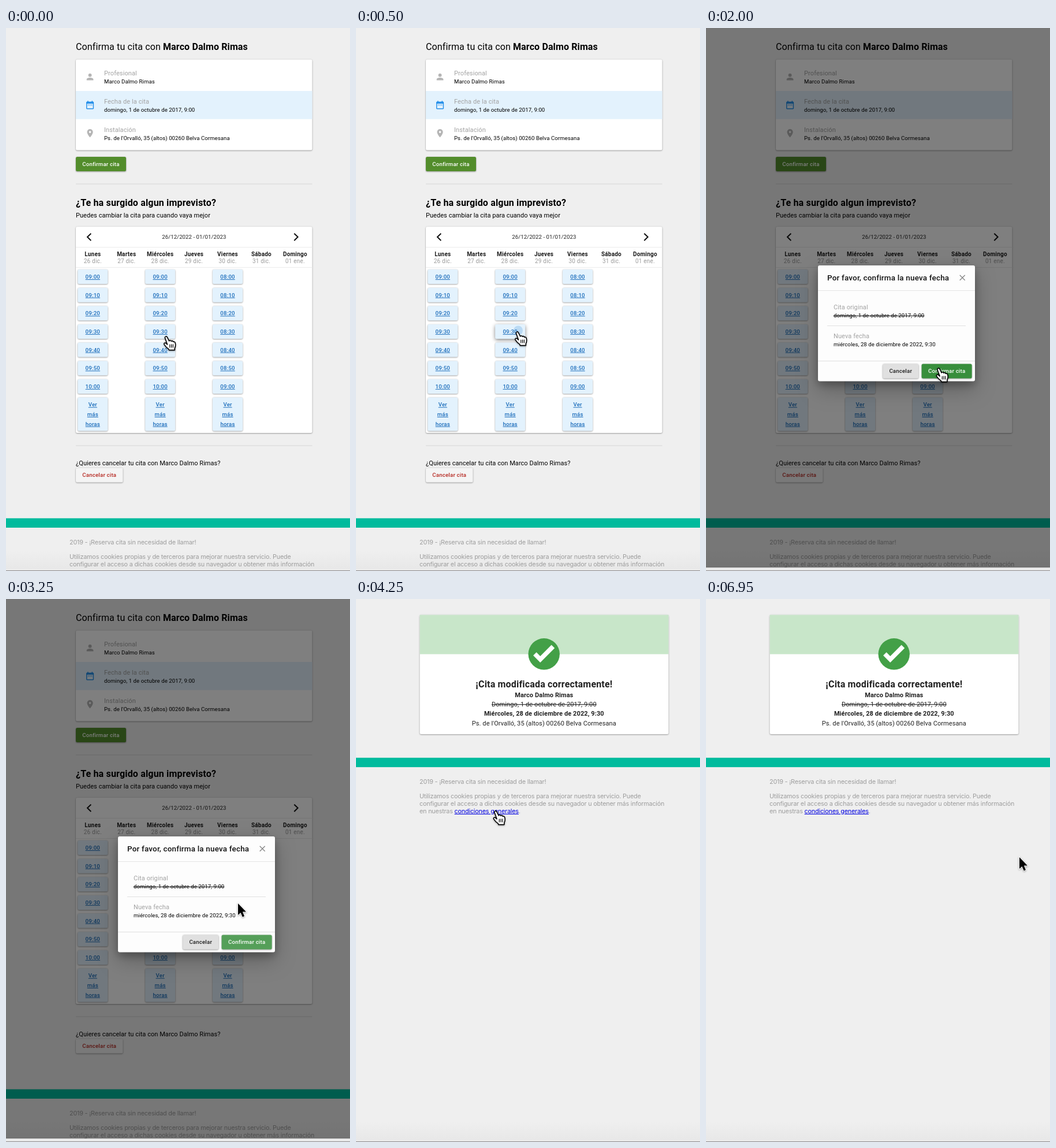
An HTML page that plays this animation: 596x940 px, repeating every 7.4 s.

```html
<!DOCTYPE html>
<html lang="es">
<head>
<meta charset="utf-8">
<title>Cambio de cita</title>
<style>
html, body { margin: 0; width: 100%; height: 100%; overflow: hidden; background: #efefef; }
svg { display: block; width: 596px; height: 940px; font-family: Roboto, sans-serif; }
.h { font-size: 16px; letter-spacing: .12px; }
.h.b { letter-spacing: .17px; }
.p { font-size: 11px; letter-spacing: .05px; }
.label { font-size: 11px; letter-spacing: .1px; fill: #a2a2a2; }
.s { font-size: 9.6px; letter-spacing: .07px; }
.btn { font-size: 9.6px; letter-spacing: .2px; font-weight: 500; }
.day { font-size: 10px; letter-spacing: .2px; }
.r { font-size: 11px; letter-spacing: .09px; fill: #212121; }
.foot { font: 10.8px Inter, sans-serif; letter-spacing: -.19px; fill: #9d9d9d; }
.slot { fill: #1c6dbb; text-decoration: underline; }
.title { font-size: 13.4px; letter-spacing: .22px; font-weight: 500; fill: #111; }
.b { font-weight: 700; }
.m { text-anchor: middle; }
.strike { text-decoration: line-through; }
.link { fill: #0000e0; text-decoration: underline; }
.up { filter: drop-shadow(0 1px 1px rgba(0,0,0,.3)) drop-shadow(0 0 1px rgba(0,0,0,.12)); }
.up.hover { filter: drop-shadow(0 2px 3px rgba(0,0,0,.5)); }
.high { filter: drop-shadow(0 6px 7px rgba(0,0,0,.25)) drop-shadow(0 12px 17px rgba(0,0,0,.25)); }
.cursor { filter: drop-shadow(0 1.5px 1.5px rgba(0,0,0,.35)); }
</style>
</head>
<body>
<svg id="stage" viewBox="0 0 596 940"></svg>
<script>
const LOOP = 7400;
const NAME = "Marco Dalmo Rimas";
const PLACE = "Ps. de l'Orvalló, 35 (altos) 00260 Belva Cormesana";
const OLD = "omingo, 1 de octubre de 2017, 9:00";
const NEW = "iércoles, 28 de diciembre de 2022, 9:30";

const text = (x, y, cls, str, fill = "") =>
  `<text x="${x}" y="${y}" class="${cls}"${fill && ` style="fill:${fill}"`}>${str}</text>`;
const box = (x, y, w, h, fill, extra = "") =>
  `<rect x="${x}" y="${y}" width="${w}" height="${h}" fill="${fill}" ${extra}/>`;
const raised = (x, y, w, h, fill, extra = "") =>
  box(x, y, w, h, fill, `rx="2.5" class="up" ${extra}`);
const icon = (x, y, scale, fill, d) =>
  `<path transform="translate(${x} ${y}) scale(${scale})" fill="${fill}" d="${d}"/>`;
const stroke = (d, color, width) =>
  `<path d="${d}" fill="none" stroke="${color}" stroke-width="${width}"/>`;

const DAYS = ["Lunes", "Martes", "Miércoles", "Jueves", "Viernes", "Sábado", "Domingo"];
const DATES = ["26 dic.", "27 dic.", "28 dic.", "29 dic.", "30 dic.", "31 dic.", "01 ene."];
const colX = i => 150.3 + i * 58.43;

function slots(col, start) {
  const x = colX(col);
  let out = "";
  for (let i = 0; i < 7; i++) {
    const y = 418 + i * 31.65;
    const min = start * 60 + i * 10;
    const label = [Math.floor(min / 60), min % 60].map(n => String(n).padStart(2, "0")).join(":");
    const id = col === 2 && i === 3 ? 'id="picked"' : "";
    out += raised(x - 26, y, 52, 25, "#e3f2fd", id) + text(x, y + 16, "btn slot m", label);
  }
  out += raised(x - 26, 639.5, 52, 58, "#e3f2fd");
  ["Ver", "más", "horas"].forEach((word, i) => {
    out += text(x, 655.3 + i * 16.7, "btn slot m", word);
  });
  return out;
}

const infoRow = (y, label, value) =>
  text(170, y, "label", label) + text(170, y + 14.4, "s", value);

const footer = y => `<g transform="translate(0 ${y})">
  ${box(0, 0, 596, 16.3, "#00bb9d")}
  ${text(110, 45.5, "foot", "2019 - ¡Reserva cita sin necesidad de llamar!")}
  ${text(110, 70, "foot", "Utilizamos cookies propias y de terceros para mejorar nuestra servicio. Puede")}
  ${text(110, 83, "foot", "configurar el acceso a dichas cookies desde su navegador u obtener más información")}
  ${text(110, 96, "foot", 'en nuestras <tspan class="link">condiciones generales</tspan>.')}
</g>`;

const booking = () => `<g id="booking">
  ${text(121, 38, "h", `Confirma tu cita con <tspan class="b">${NAME}</tspan>`)}
  ${raised(121, 54.5, 409.5, 157, "#fff")}
  ${box(121, 109, 409.5, 48.7, "#e3f2fd")}
  ${icon(136.8, 75.8, .73, "#b5b5b5", "M12 4a4 4 0 1 1 0 8a4 4 0 1 1 0-8M12 14c4.4 0 8 1.8 8 4v2H4v-2c0-2.2 3.6-4 8-4z")}
  ${icon(136.8, 124.5, .73, "#2790ea", "M9 11H7v2h2zM13 11h-2v2h2zM17 11h-2v2h2zM19 4h-1V2h-2v2H8V2H6v2H5a2 2 0 0 0-2 2v14a2 2 0 0 0 2 2h14a2 2 0 0 0 2-2V6a2 2 0 0 0-2-2zM19 20H5V9h14z")}
  ${icon(136.8, 173.5, .73, "#b5b5b5", "M12 11.5A2.5 2.5 0 0 1 9.5 9A2.5 2.5 0 0 1 12 6.5A2.5 2.5 0 0 1 14.5 9A2.5 2.5 0 0 1 12 11.5M12 2A7 7 0 0 0 5 9c0 5.2 7 13 7 13s7-7.8 7-13a7 7 0 0 0-7-7z")}
  ${infoRow(81.5, "Profesional", NAME)}
  ${infoRow(130.5, "Fecha de la cita", "d" + OLD)}
  ${infoRow(179.5, "Instalación", PLACE)}
  ${raised(121, 223, 87, 25, "#538d2c")}
  ${text(164.5, 238.8, "btn m", "Confirmar cita", "#fff")}
  ${box(121, 269.5, 409.5, 1, "#d6d6d6")}
  ${text(121, 308, "h b", "¿Te ha surgido algun imprevisto?")}
  ${text(121, 327.5, "p", "Puedes cambiar la cita para cuando vaya mejor")}
  ${raised(121, 344, 409.5, 357, "#fff")}
  ${text(325.8, 365.2, "s m", "26/12/2022 - 01/01/2023", "#222")}
  ${stroke("M147.3 355.7L141 361.8L147.3 368M499.3 355.7L505.6 361.8L499.3 368", "#111", 2)}
  ${box(121, 379, 409.5, 1, "#ececec")}
  ${box(121, 414, 409.5, 1, "#ececec")}
  ${DAYS.map((d, i) => text(colX(i), 395, "day b m", d, "#1c1c1c") + text(colX(i), 406.5, "day m", DATES[i], "#9a9a9a")).join("")}
  ${slots(0, 9)}${slots(2, 9)}${slots(4, 8)}
  <circle id="ripple" cx="281" cy="523.5" r="8" fill="#2b83d8" opacity=".22"/>
  ${box(121, 722.5, 409.5, 1, "#d6d6d6")}
  ${text(121, 757, "p", `¿Quieres cancelar tu cita con ${NAME}?`)}
  ${raised(121, 761.5, 81.5, 25, "#f4f4f4")}
  ${text(161.8, 777, "btn m", "Cancelar cita", "#b5261f")}
  ${footer(848.7)}
</g>`;

const dialog = () => `<g id="dialog">
  ${box(0, 0, 596, 934, "#000", 'opacity=".5"')}
  ${box(194, 411, 272, 200.5, "#fdfdfd", 'rx="3" class="high"')}
  ${box(194, 454, 272, 1, "#e4e4e4")}
  ${text(210, 437, "title", "Por favor, confirma la nueva fecha")}
  ${stroke("M439.7 427.7L448.7 436.7M448.7 427.7L439.7 436.7", "#858585", 1.3)}
  ${text(221, 487, "label", "Cita original")}
  ${text(221, 501.3, "s strike", "d" + OLD)}
  ${box(210, 515, 240, 1, "#e0e0e0")}
  ${text(221, 537.3, "label", "Nueva fecha")}
  ${text(221, 551.3, "s", "m" + NEW)}
  ${box(194, 576, 272, 1, "#e0e0e0")}
  ${raised(306.3, 581.5, 62, 25, "#e0e0e0")}
  ${text(337.2, 597.3, "btn m", "Cancelar", "#1c1c1c")}
  ${raised(373.6, 581.5, 87, 25, "#388e3c", 'id="accept"')}
  ${text(417.2, 597.3, "btn m", "Confirmar cita", "#fff")}
</g>`;

const done = () => `<g id="done">
  ${raised(110.5, 27.5, 431, 206.5, "#fff")}
  ${box(110.5, 27.5, 431, 68, "#c8e6c9")}
  <circle cx="325.7" cy="95.3" r="27.2" fill="#43a047"/>
  ${icon(301.6, 70, 1.96, "#fff", "M9 20.42L2.79 14.21L5.62 11.38L9 14.77L18.88 4.88L21.71 7.71z")}
  ${text(325.8, 152.8, "h b m", "¡Cita modificada correctamente!", "#212121")}
  ${text(325.8, 169.6, "r b m", NAME)}
  ${text(325.8, 186, "r m strike", "D" + OLD)}
  ${text(325.8, 202, "r b m", "M" + NEW)}
  ${text(325.8, 218.7, "r m", PLACE)}
  ${footer(274.8)}
</g>`;

const $ = id => document.getElementById(id);
$("stage").innerHTML = `
  <defs><linearGradient id="fade" x2="0" y2="1">
    <stop stop-color="#efefef"/><stop offset="1" stop-color="#e7e7e7"/>
  </linearGradient></defs>
  ${box(0, 0, 596, 940, "#efefef")}
  ${box(0, 905, 596, 35, "url(#fade)")}
  ${booking()}${dialog()}${done()}
  ${box(0, 934, 596, 5, "#e9e9e9")}
  ${box(0, 939, 596, 1, "#8b888c")}
  <path id="arrow" class="cursor" d="M0 0V20L4.5 15.9L7.8 23.4L11 22L7.9 14.6H14Z" stroke="#fff" stroke-width="1.8" paint-order="stroke"/>
  <g id="hand" class="cursor" stroke="#000" stroke-width="1.6" stroke-linejoin="round" stroke-linecap="round">
    <path fill="#fff" d="M2.2 4.3C1 1 4.6-.3 6 2.6L9.2 9C9.4 7.4 12 7.2 12.8 9.3C13.5 8 15.8 8.4 16.3 10.4C17.4 9.4 19.2 10.2 19.7 12.2C20.6 16 20.2 18.8 18.8 21.4V24.6H8.8L8.2 22.6C5.2 20.6 2.4 17.8.6 14.8C-.4 12.4 2.2 11.4 3.8 13L6 14.8Z"/>
    <path fill="none" stroke-width="1.2" d="M10.3 15V20M13.1 14.8V20M15.9 14.8V20"/>
  </g>`;

// Pointer steps: time, x, y, pointing hand or not
const STEPS = [
  [0, 273.5, 533, 1], [250, 274.5, 529, 1], [500, 275.5, 525, 1],
  [750, 281, 523, 0], [1250, 315, 541, 0], [1500, 364, 566, 0],
  [1750, 393, 584, 1], [2000, 399, 588, 1], [3250, 402, 527, 0],
  [3500, 424, 472, 0], [3750, 435, 458, 0], [4000, 439, 439, 0],
  [4250, 238, 366, 1], [5000, 469, 388, 0], [5250, 541, 445, 0], [5500, 543, 447, 0]
];

const show = (id, on) => $(id).setAttribute("display", on ? "inline" : "none");

function draw(t) {
  const within = (a, b) => t >= a && t < b;
  show("booking", t < 3500);
  show("dialog", within(750, 3500));
  show("done", t >= 3500);
  show("ripple", within(500, 750));
  $("picked").classList.toggle("hover", within(500, 750));
  $("accept").classList.toggle("hover", within(2250, 3250));
  $("accept").setAttribute("fill", t >= 3250 ? "#559f59" : "#388e3c");

  const [, x, y, hand] = STEPS.findLast(s => s[0] <= t);
  show("hand", hand);
  show("arrow", !hand);
  $(hand ? "hand" : "arrow").setAttribute("transform", `translate(${x} ${y})`);
}

const begin = performance.now();
function tick() {
  draw((performance.now() - begin) % LOOP);
  requestAnimationFrame(tick);
}
tick();
</script>
</body>
</html>
```
